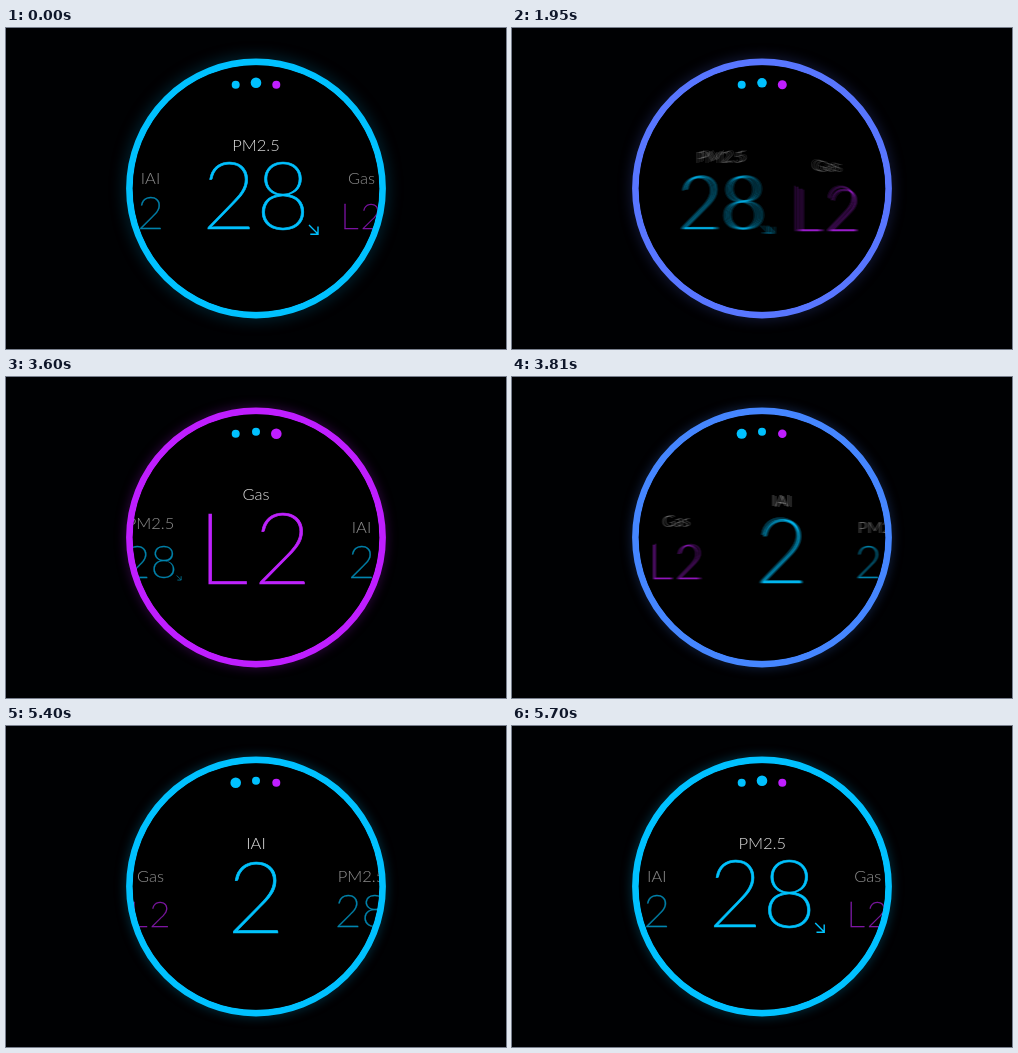
Recreate the animation shown at these times as an HTML page with a canvas. Size 500 by 321 pixels, loop 5.73 s.

```html
<!DOCTYPE html>
<html lang="en">
<head>
<meta charset="utf-8">
<title>Air quality dial</title>
<style>
  html, body { margin: 0; height: 100%; overflow: hidden; background: #000103; }
  canvas { display: block; }
</style>
</head>
<body>
<canvas id="stage" width="500" height="321"></canvas>
<script>
const stage = document.getElementById('stage');
const ctx = stage.getContext('2d');
const layer = stage.cloneNode().getContext('2d');
const LOOP = 5730, HOLD = 1800, SLIDE = 330, BLUR_SAMPLES = 7, BLUR_MS = 10;
const CX = 250, CY = 160.5;
const CYAN = [0, 193, 255], PURPLE = [192, 30, 255], WHITE = [255, 255, 255];

// Sizes and baselines are given for the centre slot; `small` is the side size.
const items = [
  { label: 'IAI', value: '2', color: CYAN, size: 100, small: 46, base: 207 },
  { label: 'PM2.5', value: '28', color: CYAN, size: 93, small: 46, base: 201, arrow: true },
  { label: 'Gas', value: 'L2', color: PURPLE, size: 100, small: 36, base: 207, spacing: 0.055 }
];

const clamp = v => Math.min(1, Math.max(0, v));
const mix = (a, b, k) => a + (b - a) * k;
const rgb = (c, light = 1) => `rgb(${c.map(v => Math.round(v * light))})`;
const ease = k => k < 0.5 ? 4 * k ** 3 : 1 - 4 * (1 - k) ** 3;

// Progress through the carousel: whole numbers are resting positions.
const progress = (t, curve) =>
  [1, 2, 3].reduce((sum, n) => sum + curve(clamp((t - n * HOLD) / SLIDE)), 1);

// Signed slot of an item, wrapped to -1.5 .. 1.5
const slotOf = (i, pos) => {
  const d = i - pos;
  return d - 3 * Math.round(d / 3);
};

function disc(x, y, r, color) {
  ctx.beginPath();
  ctx.arc(x, y, r, 0, Math.PI * 2);
  ctx.fillStyle = color;
  ctx.fill();
}

function drawArrow(x, y, scale) {
  layer.save();
  layer.translate(x, y);
  layer.scale(scale, scale);
  layer.lineWidth = 1.4;
  layer.beginPath();
  layer.moveTo(53, -4);
  layer.lineTo(62, 5);
  layer.moveTo(62, -2.5);
  layer.lineTo(62, 5.2);
  layer.lineTo(54.3, 5.2);
  layer.stroke();
  layer.restore();
}

function drawItem(item, d) {
  const away = Math.abs(d), side = Math.min(1, away);
  const x = CX + Math.sign(d) * (105.5 * side + 75 * Math.max(0, away - 1));
  const size = mix(item.size, item.small, side);
  const y = mix(item.base, 200.5, side);
  const drop = item.arrow && d < 0 ? 28.5 : 32.5;

  layer.fillStyle = rgb(WHITE, mix(0.88, 0.56, side));
  layer.font = '300 16.5px Lato, sans-serif';
  layer.letterSpacing = '0px';
  layer.fillText(item.label, x, 123.3 + drop * side);

  layer.fillStyle = layer.strokeStyle = rgb(item.color, mix(1, 0.68, side));
  layer.font = `280 ${size}px Lato, sans-serif`;
  const gap = (item.spacing || 0) * size;
  layer.letterSpacing = gap + 'px';
  layer.lineWidth = size * 0.007;
  layer.fillText(item.value, x + gap / 4, y);
  layer.strokeText(item.value, x + gap / 4, y);
  if (item.arrow) drawArrow(x, y, size / item.size);
}

function drawCarousel(pos) {
  layer.clearRect(0, 0, 500, 321);
  layer.textAlign = 'center';
  items.forEach((item, i) => {
    const d = slotOf(i, pos);
    drawItem(item, d);
    if (Math.abs(d) > 1) drawItem(item, d - 3 * Math.sign(d));
  });
}

function drawRing(t) {
  const pos = progress(t, k => k), from = Math.floor(pos);
  const a = items[from % 3].color, b = items[(from + 1) % 3].color;
  const color = a.map((v, i) => mix(v, b[i], pos - from));
  ctx.save();
  ctx.beginPath();
  ctx.arc(CX, CY, 126.5, 0, Math.PI * 2);
  ctx.strokeStyle = rgb(color);
  ctx.lineWidth = 6.8;
  ctx.shadowColor = rgb(color, 0.32);
  ctx.shadowBlur = mix(15, 11, clamp((t - HOLD) / SLIDE));
  ctx.stroke();
  ctx.restore();
}

function render(t) {
  ctx.fillStyle = '#000103';
  ctx.fillRect(0, 0, 500, 321);
  drawRing(t);

  ctx.save();
  ctx.beginPath();
  ctx.arc(CX, CY, 123.3, 0, Math.PI * 2);
  ctx.clip();
  ctx.fillStyle = '#000';
  ctx.fillRect(0, 0, 500, 321);

  // Motion blur: average of nearby moments, a single one at rest
  const pos = progress(t, ease);
  const count = pos % 1 ? BLUR_SAMPLES : 1;
  ctx.globalCompositeOperation = 'lighter';
  ctx.globalAlpha = 1 / count;
  for (let k = 0; k < count; k++) {
    const shift = ((k + 0.5) / count - 0.5) * BLUR_MS;
    drawCarousel(progress(t + shift, ease));
    ctx.drawImage(layer.canvas, 0, 0);
  }
  ctx.restore();

  items.forEach((item, i) => {
    const focus = clamp(1 - Math.abs(slotOf(i, pos)));
    disc(229.7 + 20.3 * i, i === 1 ? 54.8 : 56.8, mix(4, 5.3, focus), rgb(item.color));
  });
}

const start = performance.now();
function tick() {
  render((performance.now() - start) % LOOP);
  requestAnimationFrame(tick);
}
tick();
</script>
</body>
</html>
```
